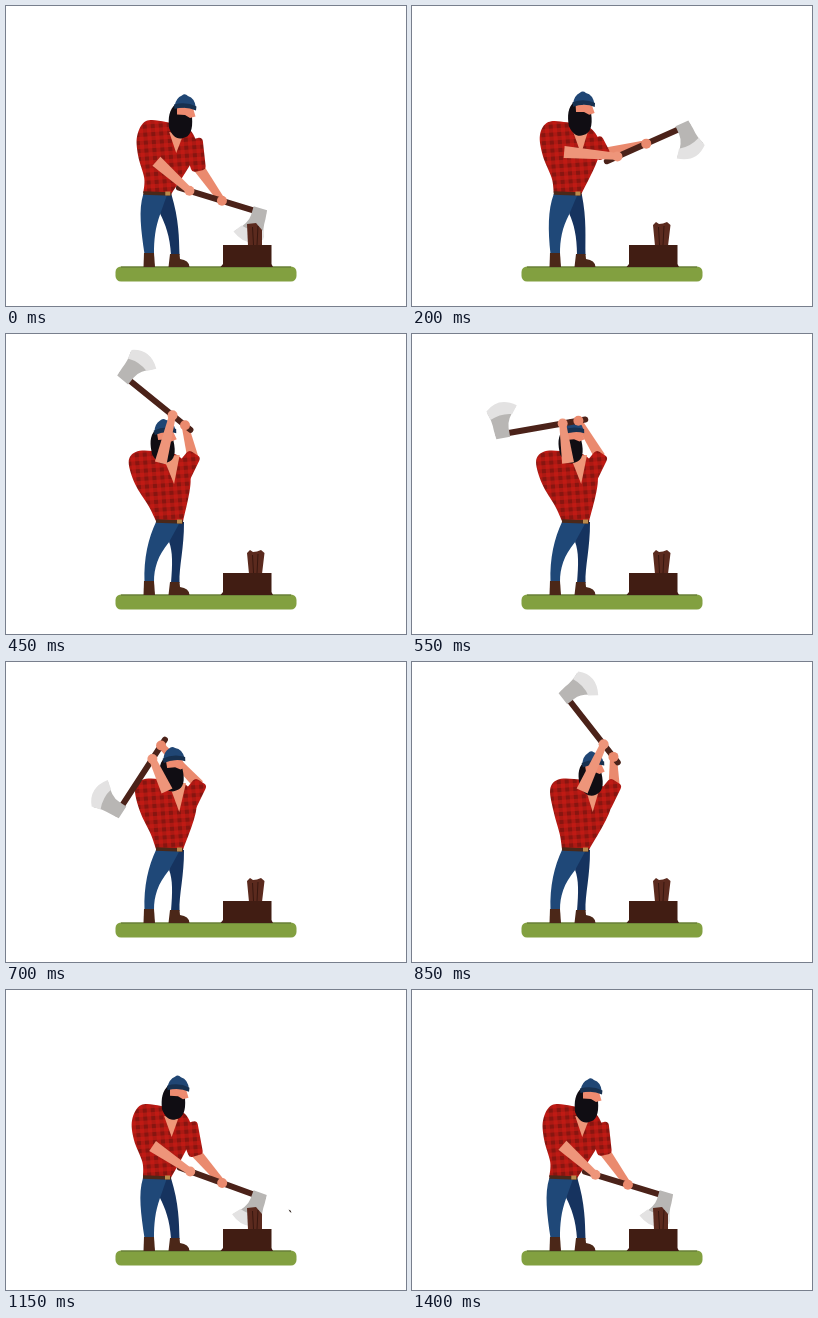
Write an HTML page that moves like this. It is 400 px wide and 300 px high and loops after 1450 ms.

```html
<!DOCTYPE html>
<html lang="en">
<head>
<meta charset="utf-8">
<title>Lumberjack</title>
<style>
html, body { margin: 0; width: 100%; height: 100%; overflow: hidden; background: #fff; }
svg { display: block; width: 100vw; height: 100vh; }
</style>
</head>
<body>
<svg viewBox="0 0 400 300" xmlns="http://www.w3.org/2000/svg">
  <defs>
    <pattern id="plaid" width="8" height="8" patternUnits="userSpaceOnUse" patternTransform="rotate(-4)">
      <rect width="8" height="8" fill="#c01a14"/>
      <path d="M0 2H8M2 0V8" stroke="#5c100e" stroke-width="4" opacity=".2"/>
      <rect width="4" height="4" fill="#5a100e" opacity=".45"/>
    </pattern>
  </defs>
  <rect x="109.500" y="260.500" width="181" height="15" rx="5.500" fill="#82a040"/>
  <path d="M115 261H285" stroke="#5d7034"/>

  <path id="legFar" fill="#16335f"/>
  <path id="legNear" fill="#1f4878"/>
  <path d="M138 247H148L149 261H137.500Z" fill="#4b2718"/>
  <path d="M164 248H173.500L174 253Q183 254 183.500 261H162.500Z" fill="#4b2718"/>

  <path id="foreFar" fill="#ea8a6e"/>
  <g fill="url(#plaid)" stroke="url(#plaid)" stroke-linejoin="round">
    <path id="sleeveFar" stroke-width="8"/>
    <path id="torso" stroke="none"/>
    <path id="sleeveNear" stroke-width="6"/>
  </g>
  <path id="belt" stroke="#4a2819" stroke-width="3.600"/>
  <rect id="buckle" width="5" height="4" fill="#b98a4c"/>
  <path id="collar" fill="#ee9678"/>

  <g id="head">
    <path d="M170 98C163 103 162 112 163 122C166 130 171 134 177 132C184 131 187 124 186 111L181 107L177 99Z" fill="#100d13"/>
    <path d="M171 101L187 102L189.500 110.500L184 112L179 109L171 108.500Z" fill="#ee8b70"/>
    <path d="M168.500 100Q170 92 176 89.500Q179 87 182 90Q189 92 190 102Q180 97 168.500 100Z" fill="#204674"/>
    <path d="M168 98.500Q180 95 190.500 100.500L190 104.500Q180 100 168.500 103Z" fill="#17304f"/>
  </g>

  <g id="axe">
    <path d="M2 0H90" stroke="#4b2219" stroke-width="6" stroke-linecap="round"/>
    <path d="M79 -4H93L94 5Q94 15 97.500 23Q84 29 68 25Q79 14 79 5Z" fill="#b8b6b4"/>
    <path d="M95.500 16L98 25Q84 38 67 26L73 18Q84 21 95.500 16Z" fill="#e3e2e2"/>
  </g>
  <path id="foreNear" fill="#ee957a"/>
  <circle id="handFar" r="5" fill="#ea8a6e"/>
  <circle id="handNear" r="5" fill="#ee957a"/>

  <path id="log" fill="#5b2a1e"/>
  <path d="M246.500 221L247.500 239M252 220L251 239" stroke="#38170f" fill="none"/>
  <path d="M217 239H265.500V258L267 261H214.500L217 258Z" fill="#411d13"/>
  <path id="chip" d="M-1.500 -1.500L.5 -.5L1.500 1.800L0 1Z" fill="#2d211c"/>
</svg>
<script>
const LOOP = 1450, STEP = 50, HIT = 1000, REBOUND = 1150;
const el = {};
document.querySelectorAll('svg [id]').forEach(n => el[n.id] = n);
const set = (id, attrs) => {
  for (const name in attrs) el[id].setAttribute(name, attrs[name]);
};
const clamp = v => Math.min(1, Math.max(0, v));
const mix = (a, b, k) => a + (b - a) * k;

// Body with the axe lowered and raised; everything between is a blend.
const low = {
  torso: [[137,187], [138,172], [132,150], [131,130], [140,115], [160,116], [184,124], [189,148], [165,188]],
  collar: [[163,126], [177,129], [170,147]],
  near: [[143,130], [150,156]],
  far: [[187,137], [192,162]]
};
const high = {
  torso: [[150,187], [147,172], [140,150], [136,128], [143,118], [160,117], [186,122], [197,145], [177,188]],
  collar: [[170,122], [187,121], [179,150]],
  near: [[149,133], [168,129]],
  far: [[189,140], [200,123]]
};

// Time, butt of the axe x and y, axe angle, lean of the body.
const swing = [
  [0, 171, 181, 17, 0],
  [200, 193, 156, -24, -7],
  [450, 186, 97, -141, -19],
  [700, 160, 76, -237, -10],
  [850, 207, 102, -128, 3],
  [HIT, 172, 177, 20, -7],
  [REBOUND, 172, 177, 20, -7],
  [1400, 171, 181, 17, 0],
  [LOOP, 171, 181, 17, 0]
];

const rate = (i, c) => (swing[i + 1][c] - swing[i][c]) / (swing[i + 1][0] - swing[i][0]);

// Speed at a key: zero where the motion turns or rests.
function speed(i, c) {
  if (i === 0 || i === swing.length - 1) return 0;
  const a = rate(i - 1, c), b = rate(i, c);
  return a * b > 0 ? 2 * a * b / (a + b) : 0;
}

function track(t, c) {
  const i = swing.findIndex((key, n) => t < swing[n + 1][0]);
  const h = swing[i + 1][0] - swing[i][0], s = (t - swing[i][0]) / h;
  return mix(swing[i][c], swing[i + 1][c], s * s * (3 - 2 * s))
    + h * s * (1 - s) * ((1 - s) * speed(i, c) - s * speed(i + 1, c));
}

const pt = p => p.map(v => v.toFixed(2)).join(' ');

// Smooth curve through the points, closed by a straight edge.
function curve(p) {
  let d = 'M' + pt(p[0]);
  for (let i = 0; i < p.length - 1; i++) {
    const a = p[i - 1] || p[i], b = p[i], c = p[i + 1], e = p[i + 2] || c;
    d += 'C' + [b.map((v, j) => v + (c[j] - a[j]) / 6),
      c.map((v, j) => v - (e[j] - b[j]) / 6), c].map(pt).join(',');
  }
  return d + 'Z';
}

// Tapered limb with half widths wa and wb.
function limb(id, a, b, wa, wb) {
  const dx = b[0] - a[0], dy = b[1] - a[1], n = Math.hypot(dx, dy) || 1;
  const side = (p, w) => pt([p[0] - dy / n * w, p[1] + dx / n * w]);
  set(id, { d: `M${side(a, wa)}L${side(b, wb)}L${side(b, -wb)}L${side(a, -wa)}Z` });
}

function legs(w) {
  const d = w - 137, crotch = `${154 + d * .7} 208`;
  set('legFar', { d: `M${w + 14} 188L${crotch}C${159 + d * .6} 218 ${164 + d * .2} 230 165 249H173.500
    C173 232 ${173 + d * .4} 214 ${w + 28} 188Z` });
  set('legNear', { d: `M${w} 188C${w - 5 - d * .2} 204 ${135 + d * .2} 224 138.500 248H148
    C148 234 ${149 + d * .2} 222 ${crotch}L${w + 24} 188Z` });
}

function body(raise, lean, near, far) {
  const pose = part => low[part].map(([x, y], i) => {
    const [hx, hy] = high[part][i], py = mix(y, hy, raise);
    return [mix(x, hx, raise) + lean * .7 * clamp((187 - py) / 45), py];
  });
  const torso = pose('torso'), hemL = torso[0], hemR = torso[torso.length - 1];
  const [nearTop, nearElbow] = pose('near'), [farTop, farElbow] = pose('far');
  legs(hemL[0]);
  set('torso', { d: curve(torso) });
  set('belt', { d: `M${pt(hemL)}L${pt(hemR)}` });
  set('buckle', { x: hemR[0] - 6, y: hemR[1] - 2.5 });
  set('collar', { d: `M${pose('collar').map(pt).join('L')}Z` });
  limb('sleeveNear', nearTop, nearElbow, 7, 5);
  limb('sleeveFar', farTop, farElbow, 6, 3.5);
  limb('foreNear', nearElbow, near, 6, 3.4);
  limb('foreFar', farElbow, far, 5.5, 3.4);
  set('head', { transform: `translate(${lean} ${.4 * Math.max(lean, -8)}) rotate(${-9 * raise} 176 108)` });
}

function draw(time) {
  const t = Math.floor(time % LOOP / STEP) * STEP;
  const [x, y, deg, lean] = [1, 2, 3, 4].map(c => track(t, c));
  const a = deg * Math.PI / 180, raise = clamp((20 - deg) / 120), slide = raise ** 3;
  const along = u => [x + Math.cos(a) * u, y + Math.sin(a) * u];
  const near = along(mix(13, 25, slide)), far = along(mix(47, 9, slide));

  set('axe', { transform: `translate(${x} ${y}) rotate(${deg})` });
  set('handNear', { cx: near[0], cy: near[1] });
  set('handFar', { cx: far[0], cy: far[1] });
  body(raise, lean, near, far);

  const struck = t < 100 || t >= HIT;
  set('log', { d: struck ? 'M241 218L250 217L256 224V240H242Z'
    : 'M241 219L244 216L247 218L251 217.500L255 216L258.500 219L256 240H243Z' });

  const k = (t - HIT) / (REBOUND - HIT);
  set('chip', {
    visibility: k > 0 && k <= 1 ? 'visible' : 'hidden',
    transform: `translate(${mix(258, 284, k)} ${mix(216, 221, k) - 40 * k * (1 - k)})`
  });
}

const start = performance.now();
function tick(now) {
  draw(Math.max(0, now - start));
  requestAnimationFrame(tick);
}
draw(0);
requestAnimationFrame(tick);
</script>
</body>
</html>
```
